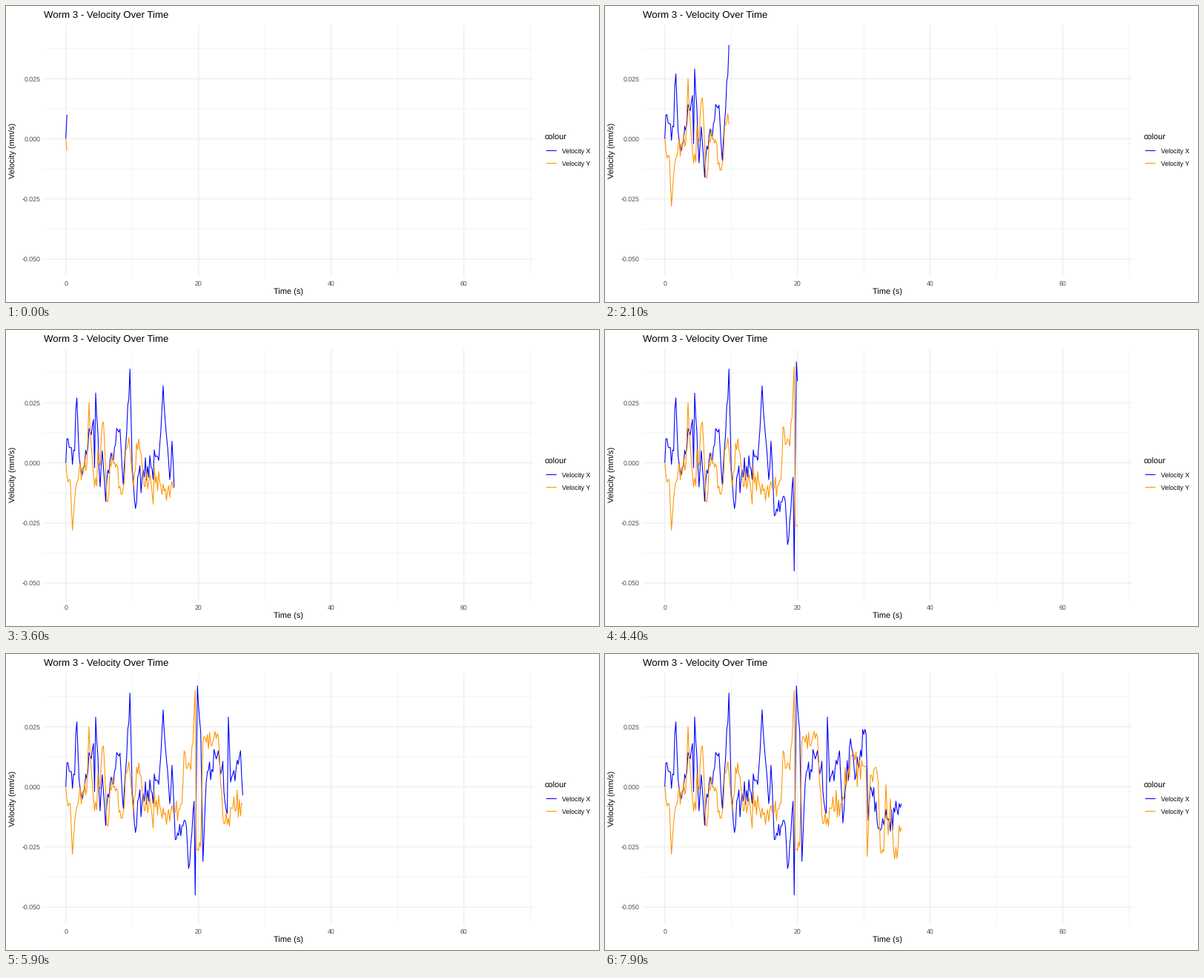
Animation, 800 px wide and 400 px high, one loop 8000 ms. Source, as a matplotlib script:

```python
import numpy as np
import matplotlib.pyplot as plt
from matplotlib.animation import FuncAnimation

W, H, DPI = 800, 400, 100
FRAMES, INTERVAL = 80, 100
X0, PX_PER_S = 80.7, 8.95      # pixel of t = 0, pixels per second
Y0, PX_PER_V = 179.5, 3.25     # pixel of v = 0, pixels per 0.001 mm/s
RATE = 6                       # samples per second
SAMPLES = np.arange(215)
BLUE, ORANGE, GREY, GRID = "#0000ff", "#ff9500", "#4d4d4d", "#ebebeb"

plt.rcParams.update({"font.family": "Liberation Sans", "text.hinting": "none"})

# Main peaks and dips: sample number, velocity in 0.001 mm/s
PEAKS_X = [(0, 0), (1, 10), (8, 5), (10, 27), (12, 3), (15, -5), (25, 18),
           (26, -2), (27, 29), (31, -10), (33, 5), (36, -16), (38, -3),
           (49, 14), (52, -9), (58, 39), (60, -2), (63, -19), (65, -6),
           (84, 1), (88, 32), (94, -7), (96, 9), (99, -22), (108, -14),
           (111, -34), (116, -6), (117, -45), (119, 42), (122, 23),
           (124, -31), (127, 2), (138, 15), (146, -11), (147, 29), (149, 2),
           (158, 15), (161, -15), (168, 20), (172, 3), (182, 22), (184, -14),
           (186, 0), (195, -18), (214, -7)]
PEAKS_Y = [(0, 0), (1, -5), (4, -7), (6, -28), (10, -8), (19, -1), (21, 25),
           (23, 7), (26, -10), (34, 17), (37, -16), (42, 4), (51, -13),
           (55, 6), (58, 6), (61, -10), (66, 10), (71, -10), (98, -10),
           (105, -7), (107, 15), (113, 7), (117, 40), (118, -26), (122, -25),
           (124, 19), (138, 21), (142, -12), (160, -7), (169, 13), (182, 8),
           (183, -29), (186, 5), (193, 2), (195, -27), (198, -27), (200, 1),
           (202, -20), (204, -5), (208, -30), (214, -17)]


def pt(px):
    return px * 72 / DPI


def to_x(t):
    return X0 + PX_PER_S * t


def to_y(v):
    return Y0 - PX_PER_V * v


def velocity(peaks, seed):
    """Join the peaks and add jitter that fades out next to each of them."""
    at, val = np.array(peaks).T
    gap = np.abs(SAMPLES[:, None] - at).min(axis=1)
    jitter = np.random.default_rng(seed).normal(0, 3.5, SAMPLES.size)
    return np.interp(SAMPLES, at, val) + jitter * np.clip(gap / 2, 0, 1)


def label(x, y, text, px=8.8, color="black", **kw):
    ax.text(x, y, text, fontsize=pt(px), color=color, **kw)


def stroke(color, xs=(), ys=(), px=1.07, z=3):
    return ax.plot(xs, ys, color=color, lw=pt(px), solid_capstyle="butt",
                   solid_joinstyle="round", snap=False, zorder=z)[0]


fig = plt.figure(figsize=(W / DPI, H / DPI), dpi=DPI, facecolor="white")
ax = fig.add_axes([0, 0, 1, 1])
ax.set_xlim(0, W)
ax.set_ylim(H, 0)
ax.axis("off")

# Thin minor grid lines below the major ones
LEFT, RIGHT, TOP, BOTTOM = 51, 711, 26, 366
for t0, v0, px in ((10, 37.5, 0.53), (0, 25, 1.07)):
    for v in np.arange(v0, -51, -25):
        stroke(GRID, [LEFT, RIGHT], [to_y(v)] * 2, px, 1)
    for t in range(t0, 71, 20):
        stroke(GRID, [to_x(t)] * 2, [TOP, BOTTOM], px, 1)

for v in (25, 0, -25, -50):
    label(46.3, to_y(v) + 3.2, f"{v / 1000:.3f}", color=GREY, ha="right")
for t in (0, 20, 40, 60):
    label(to_x(t), 378, str(t), color=GREY, ha="center")

label(51, 16, "Worm 3 - Velocity Over Time", 13.2)
label(381, 390, "Time (s)", 11, ha="center")
label(10, 195, "Velocity (mm/s)", 11, rotation=90, ha="center", va="center")

label(727, 181, "colour", 11)
for y, name, color in ((195.5, "Velocity X", BLUE), (212.5, "Velocity Y", ORANGE)):
    stroke(color, [728.7, 742.7], [y, y])
    label(749.7, y + 3.3, name)

xs = to_x(SAMPLES / RATE)
curves = [(stroke(BLUE), to_y(velocity(PEAKS_X, 3))),
          (stroke(ORANGE), to_y(velocity(PEAKS_Y, 8)))]


def draw(k):
    last = round(0.96 + 2.696 * k)
    for line, ys in curves:
        line.set_data(xs[:last + 1], ys[:last + 1])
    return [line for line, _ in curves]


anim = FuncAnimation(fig, draw, frames=FRAMES, interval=INTERVAL,
                     repeat=True, repeat_delay=0, blit=False)
plt.show()
```
